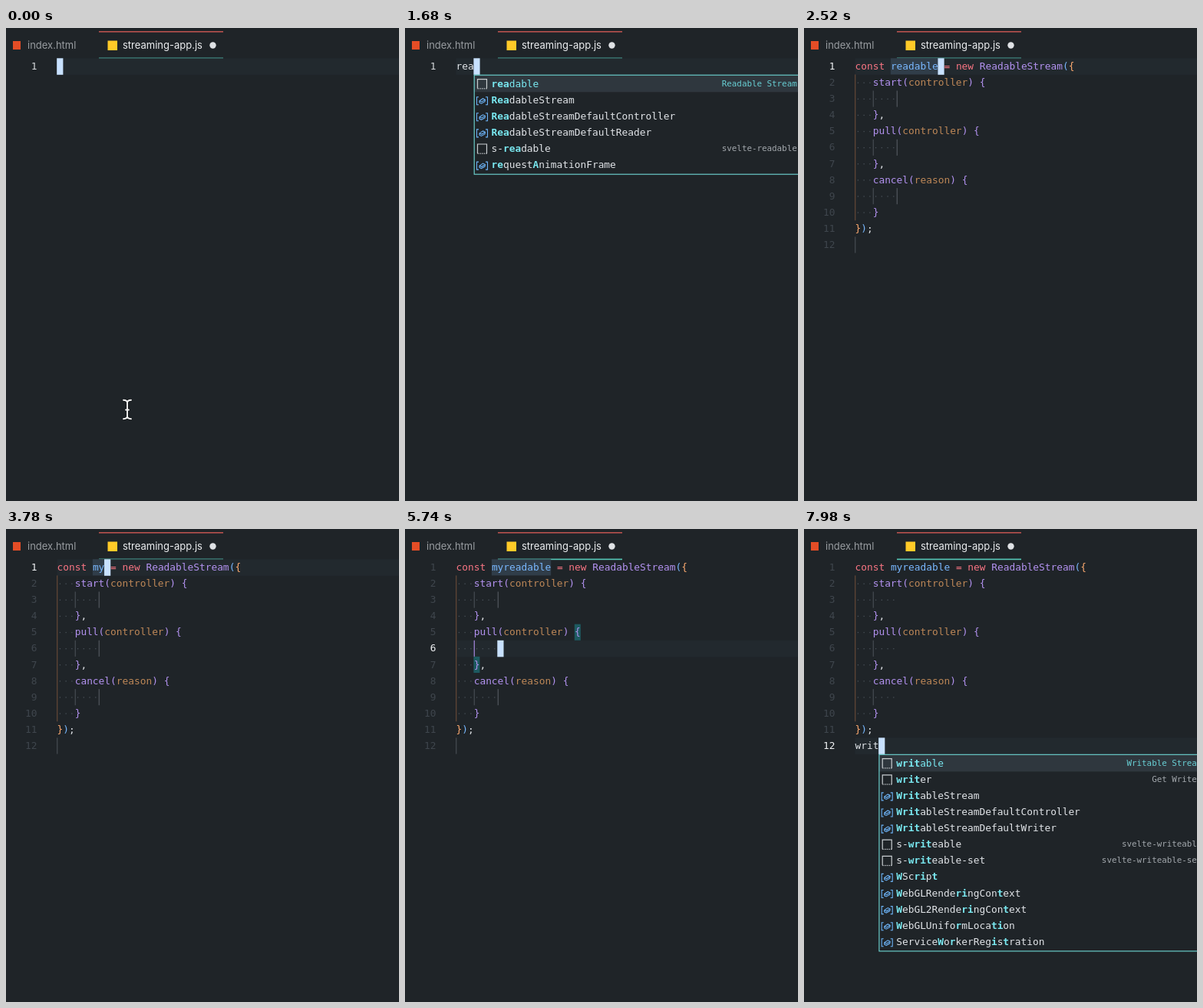
Recreate the animation shown at these times as an HTML page with a canvas. Size 512 px wide and 615 px high, loop 8000 ms.

```html
<!DOCTYPE html>
<html lang="en">
<head>
<meta charset="utf-8">
<title>Code editor</title>
<style>
html, body { margin: 0; width: 100%; height: 100%; overflow: hidden; background: #1f2428; }
canvas { display: block; }
</style>
</head>
<body>
<canvas id="stage" width="512" height="615"></canvas>
<script>
const ctx = document.getElementById('stage').getContext('2d');

const LOOP = 8000, STEP = 140, BLINK = 280;
const X0 = 66.5, Y0 = 39.3, ROW = 21.1, CHAR = 7.73;
const MONO = '"DejaVu Sans Mono", monospace';
const CODE = '12.84px ' + MONO;
const BOLD = 'bold ' + CODE;
const SMALL = '10.85px ' + MONO;
const TAB = '13px Inter, sans-serif';

const C = {
  bg: '#1f2428', line: '#22292e', text: '#e1e4e8', dim: '#3f464d', dot: '#485058',
  key: '#f97583', name: '#79b8ff', fn: '#b392f0', arg: '#bd8757', brace: '#ffab70',
  guide: '#4a5056', outer: '#6b4b38', caret: '#c8e1ff', field: '#303d49',
  pair: '#1d5a60', cyan: '#79e8f0', border: '#6fd9d6', pick: '#2f373e', note: '#a3a8ad'
};

const readItems = [
  ['readable', 'Readable Stream'], ['ReadableStream'], ['ReadableStreamDefaultController'],
  ['ReadableStreamDefaultReader'], ['s-readable', 'svelte-readable'], ['return'], ['Request'],
  ['Response'], ['RegExp'], ['ReferenceError'], ['removeEventListener'], ['requestAnimationFrame']
];
const writeItems = [
  ['writable', 'Writable Stream'], ['writer', 'Get Writer'], ['WritableStream'],
  ['WritableStreamDefaultController'], ['WritableStreamDefaultWriter'],
  ['s-writeable', 'svelte-writeable'], ['s-writeable-set', 'svelte-writeable-set'], ['WScript'],
  ['WebGLRenderingContext'], ['WebGL2RenderingContext'], ['WebGLUniformLocation'],
  ['ServiceWorkerRegistration']
];

const colX = col => X0 + col * CHAR;
const rowY = row => Y0 + (row - 1) * ROW;

function box(x, y, w, h, color) {
  ctx.fillStyle = color;
  ctx.fillRect(x, y, w, h);
}

function write(str, x, y, color, font = CODE, align = 'left') {
  ctx.font = font;
  ctx.textAlign = align;
  ctx.fillStyle = color;
  ctx.fillText(str, x, y);
}

function codeLine(row, col, parts) {
  for (const [str, color] of parts) {
    write(str, colX(col), rowY(row) + 14.6, color);
    col += str.length;
  }
}

function dots(row, count) {
  for (let i = 0; i < count; i++) {
    box(colX(i + 0.5) - 0.6, rowY(row) + 10.2, 1.3, 1.3, C.dot);
  }
}

function numbers(count, active) {
  for (let n = 1; n <= count; n++) {
    write(n, 40.4, rowY(n) + 14.6, n === active ? '#f0f2f4' : C.dim, CODE, 'right');
  }
}

function tabs() {
  box(9, 17, 10, 11, '#e44d26');
  write('index.html', 28, 26.6, '#989ca0', TAB);
  box(121, 4, 162, 1.6, '#b9524e');
  box(121, 38.6, 162, 1.6, '#55c9b8');
  box(132.5, 16.5, 12.5, 12.5, '#ffca28');
  write('streaming-app.js', 152, 26.6, '#eceef0', TAB);
  ctx.fillStyle = '#dfe2e5';
  ctx.beginPath();
  ctx.arc(269.5, 22.5, 4.2, 0, 7);
  ctx.fill();
}

// Indices of matched letters, taking the longest run first; null without a match.
function match(label, query) {
  const low = label.toLowerCase(), hits = [];
  let from = 0, rest = query;
  while (rest) {
    let n = rest.length;
    while (n && low.indexOf(rest.slice(0, n), from) < 0) n--;
    if (!n) return null;
    const at = low.indexOf(rest.slice(0, n), from);
    for (let i = 0; i < n; i++) hits.push(at + i);
    from = at + n;
    rest = rest.slice(n);
  }
  return hits;
}

function find(label, query) {
  const hits = match(label, query);
  if (hits || query !== 'writ') return hits;
  return match(label, 'wrti');
}

function snippetIcon(x, y) {
  ctx.strokeStyle = '#c9cdd1';
  ctx.lineWidth = 1.2;
  ctx.beginPath();
  ctx.moveTo(x, y + 6);
  ctx.lineTo(x, y - 6);
  ctx.lineTo(x + 12, y - 6);
  ctx.lineTo(x + 12, y + 6);
  ctx.stroke();
  for (let i = 0; i < 5; i++) box(x + i * 2.7, y + 5.6, 1.5, 1.2, '#c9cdd1');
}

function symbolIcon(x, y) {
  ctx.strokeStyle = '#6cb2f5';
  ctx.lineWidth = 1.1;
  ctx.beginPath();
  for (const [edge, inner] of [[x - 1, x + 1.5], [x + 13, x + 10.5]]) {
    ctx.moveTo(inner, y - 5);
    ctx.lineTo(edge, y - 5);
    ctx.lineTo(edge, y + 5);
    ctx.lineTo(inner, y + 5);
  }
  ctx.moveTo(x + 2.5, y);
  ctx.lineTo(x + 7, y - 3);
  ctx.lineTo(x + 10, y - 1.5);
  ctx.lineTo(x + 9.5, y + 1);
  ctx.lineTo(x + 5, y + 3.5);
  ctx.lineTo(x + 2.5, y + 2.3);
  ctx.closePath();
  ctx.moveTo(x + 2.5, y);
  ctx.lineTo(x + 5.3, y + 1.2);
  ctx.lineTo(x + 10, y - 1.5);
  ctx.stroke();
}

function popup(row, query, pool) {
  const x = colX(query.length), top = rowY(row) + ROW + 0.8;
  const list = pool.map(([label, note]) => ({ label, note, hits: find(label, query) }))
    .filter(item => item.hits);
  const h = list.length * ROW + 2.4;
  box(x, top, 520, h, C.bg);
  box(x, top, 520, ROW + 1, C.pick);
  list.forEach(({ label, note, hits }, i) => {
    const mid = top + 11.4 + i * ROW;
    const plain = i ? C.text : C.cyan;
    (note ? snippetIcon : symbolIcon)(x + 4.8, mid + (note ? 0 : 1));
    [...label].forEach((ch, k) => {
      const hit = hits.includes(k);
      write(ch, x + 22.8 + k * CHAR, mid + 4, hit ? C.cyan : plain, hit ? BOLD : CODE);
    });
    if (note) write(note, x + 421, mid + 3, i ? C.note : '#68cfd4', SMALL, 'right');
  });
  ctx.strokeStyle = C.border;
  ctx.lineWidth = 1.1;
  ctx.strokeRect(x + 0.5, top, 520, h);
}

function pointer(x, y) {
  ctx.lineCap = 'round';
  for (const [color, width] of [['#14171a', 3.6], ['#f4f4f4', 1.9]]) {
    ctx.strokeStyle = color;
    ctx.lineWidth = width;
    ctx.beginPath();
    for (const s of [-1, 1]) {
      ctx.moveTo(x - 5, y + s * 12.2);
      ctx.quadraticCurveTo(x, y + s * 12.2, x, y + s * 8.5);
      ctx.quadraticCurveTo(x, y + s * 12.2, x + 5, y + s * 12.2);
    }
    ctx.moveTo(x, y - 9);
    ctx.lineTo(x, y + 9);
    ctx.moveTo(x - 2, y + 0.5);
    ctx.lineTo(x + 2, y + 0.5);
    ctx.stroke();
  }
  ctx.lineCap = 'butt';
}

function caret(row, col) {
  box(colX(col) - 0.3, rowY(row), 8.2, ROW + 0.4, C.caret);
}

function typed(word, t, start, gap) {
  const n = Math.floor((t - start) / gap) + 1;
  return word.slice(0, Math.max(0, n));
}

function method(row, name, arg, end, active) {
  const open = 3 + name.length + arg.length + 3;
  if (active) {
    box(colX(open) - 0.3, rowY(row), 8, ROW, C.pair);
    box(colX(3) - 0.3, rowY(row + 2), 8, ROW, C.pair);
  }
  dots(row, 3);
  dots(row + 1, 7);
  dots(row + 2, 3);
  box(colX(3), rowY(row + 1), 1.1, ROW, active ? C.fn : C.guide);
  codeLine(row, 3, [[name + '(', C.fn], [arg, C.arg], [') {', C.fn]]);
  codeLine(row + 2, 3, [['}', C.fn], [end, C.text]]);
}

function firstWord(t) {
  const word = t < 1960 ? typed('read', t, 1400, STEP) : typed('readable', t, 1260, STEP).length < 6
    ? 'readab' : typed('readable', t - 1960, -5 * STEP, STEP);
  box(X0, rowY(1), 446, ROW + 0.4, C.line);
  write('1', 40.4, rowY(1) + 14.6, '#d5d8db', CODE, 'right');
  codeLine(1, 0, [[word, C.text]]);
  const off = (t >= 140 && t < 420) || (t >= 700 && t < 980);
  if (!off) caret(1, word.length);
  if (word.length > 1) popup(1, word, readItems);
  if (t < 1400) {
    const p = Math.min(1, t / 420), e = p * p * (3 - 2 * p);
    pointer(158 - 10.7 * e, 496 - 284 * e);
  }
}

function snippet(t) {
  const name = t < 3640 ? 'readable'
    : t < 3920 ? typed('my', t, 3640, STEP)
    : 'my' + typed('readable', t, 3920, 100);
  const last = typed('writ', t, 7560, STEP);
  const stops = [[1, 2380], [3, 5040], [6, 5600], [9, 6160], [12, 6720]];
  const [row, since] = stops.filter(s => t >= s[1]).pop();
  const col = row === 1 ? 6 + name.length : row === 12 ? last.length : 7;
  const done = row === 12;

  box(X0, rowY(row), 446, ROW + 0.4, C.line);
  numbers(12, row);
  if (!done) box(colX(6), rowY(1), name.length * CHAR, ROW, C.field);
  codeLine(1, 0, [['const ', C.key], [name, C.name], [' = new ', C.key],
    ['ReadableStream', C.fn], ['(', C.name], ['{', C.brace]]);
  method(2, 'start', 'controller', ',', row === 3);
  method(5, 'pull', 'controller', ',', row === 6);
  method(8, 'cancel', 'reason', '', row === 9);
  box(X0 - 0.3, rowY(2), 1.1, 9 * ROW, C.outer);
  codeLine(11, 0, [['}', C.brace], [')', C.name], [';', C.text]]);
  if (!done) {
    for (const r of [3, 6, 9]) box(colX(7), rowY(r), 1.4, ROW, C.guide);
    box(X0 - 0.3, rowY(12), 1.1, ROW, C.guide);
  }
  codeLine(12, 0, [[last, C.text]]);

  const typing = (t >= 3500 && t < 4760) || t >= 7560;
  const on = Math.floor((t - since) / BLINK) % 2 === 0;
  if (typing || on) caret(row, col);
  if (last.length > 1) popup(12, last, writeItems);
}

function draw(now) {
  const t = Math.floor((now % LOOP) / STEP) * STEP;
  box(0, 0, 512, 615, C.bg);
  tabs();
  (t < 2380 ? firstWord : snippet)(t);
}

let begin = null;
function tick(now) {
  if (begin === null) begin = now;
  draw(now - begin);
  requestAnimationFrame(tick);
}
draw(0);
requestAnimationFrame(tick);
</script>
</body>
</html>
```
